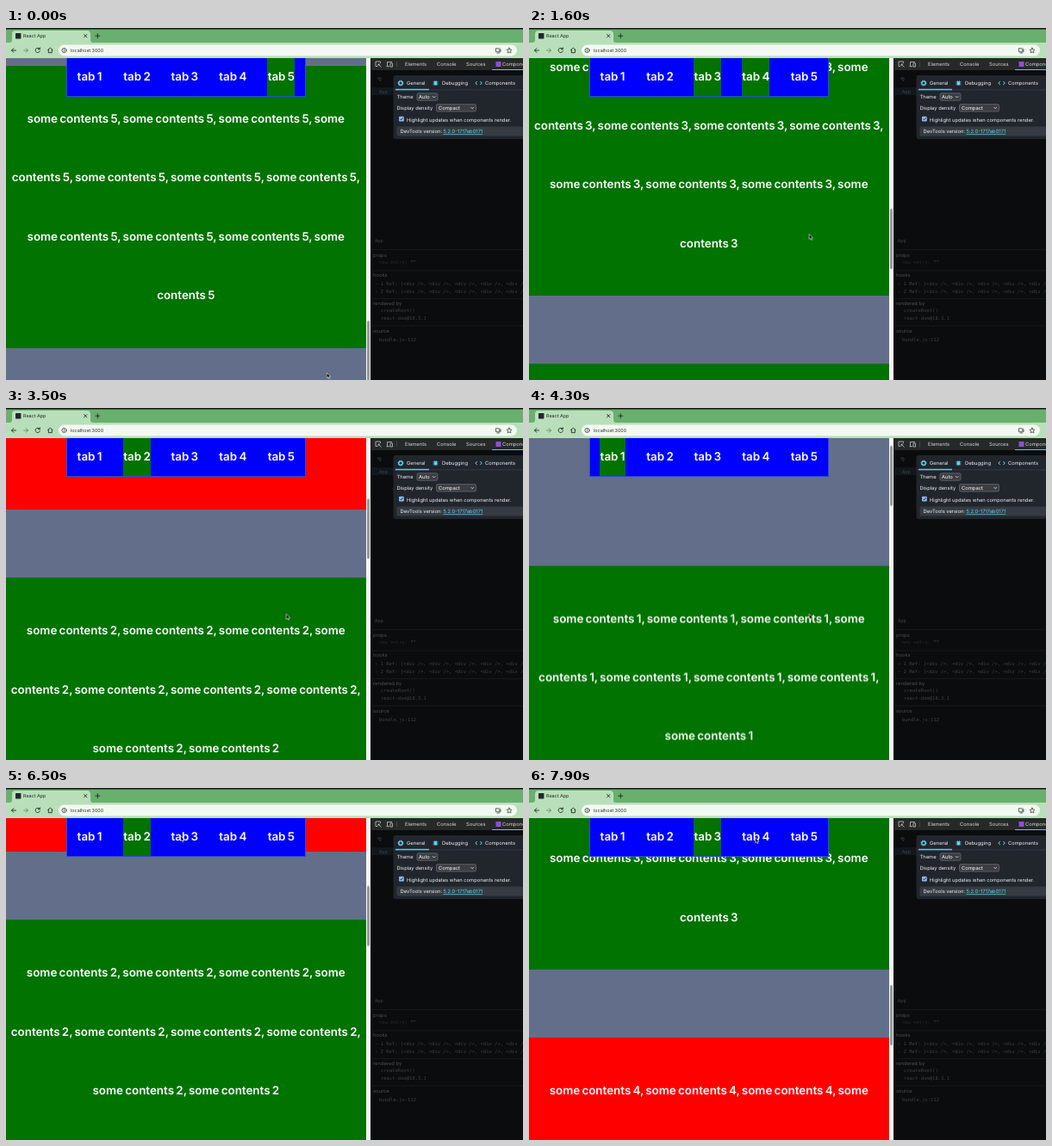
Animation of 600 by 409 pixels, one loop 8 s. Source, as an HTML page:

```html
<!DOCTYPE html>
<html lang="en">
<head>
<meta charset="utf-8">
<title>React App</title>
<style>
  html, body { margin: 0; width: 100%; height: 100%; overflow: hidden; background: #0b0d0e; }
  #stage { position: relative; width: 600px; height: 409px; overflow: hidden; font-family: Inter, "Liberation Sans", sans-serif; }
  #stage > svg { position: absolute; left: 0; top: 0; text-rendering: geometricPrecision; }
  #view { position: absolute; left: 0; top: 35px; width: 417.6px; height: 374px; overflow: hidden; background: #626e8a; color: #fff; font-weight: 600; font-size: 13.4px; word-spacing: -1.1px; text-align: center; white-space: nowrap; text-rendering: geometricPrecision; }
  #page { padding-top: 188.5px; will-change: transform; }
  section { --idle: #f00; margin-bottom: 78.8px; padding: 28.3px 0 26.3px; line-height: 68.35px; }
  nav { --idle: #00f; position: absolute; left: 70px; top: 0; width: 277.5px; height: 44.4px; line-height: 45px; }
  nav i { position: absolute; top: 0; height: 100%; background: #00f; }
  nav b { position: absolute; top: 0; height: 100%; font-weight: 600; }
  nav u { position: absolute; inset: 0 -.5px -.5px; box-sizing: border-box; border: 1px solid #2a4ccf; border-top: 0; animation: outline 8s step-end infinite; }
  #track { position: absolute; left: 417.6px; top: 35px; width: 5.8px; height: 374px; background: #f7f8f7; }
  #thumb { position: absolute; left: 1.2px; top: 1px; width: 3.4px; height: 70px; border-radius: 2px; background: #979998; }

  .n1 { animation: on1 8s step-end infinite; }
  .n2 { animation: on2 8s step-end infinite; }
  .n3 { animation: on3 8s step-end infinite; }
  .n4 { animation: on4 8s step-end infinite; }
  .n5 { animation: on5 8s step-end infinite; }
  @keyframes on1 { 0%, 77.5%, to { background: var(--idle); } 47.5% { background: #007300; } }
  @keyframes on2 { 0%, 50%, 92.5%, to { background: var(--idle); } 30%, 75% { background: #007300; } }
  @keyframes on3 { 0%, 32.5% { background: var(--idle); } 18.75%, 90%, to { background: #007300; } }
  @keyframes on4 { 0%, 21.25%, to { background: var(--idle); } 10% { background: #007300; } }
  @keyframes on5 { 0% { background: #007300; } 12.5%, to { background: var(--idle); } }
  @keyframes outline { 0%, 71.25%, to { opacity: 1; } 57.5% { opacity: 0; } }
</style>
</head>
<body>
<div id="stage">
  <div id="view">
    <div id="page"></div>
    <nav></nav>
  </div>
  <div id="track"><div id="thumb"></div></div>

  <!-- browser bar -->
  <svg width="600" height="35" font-size="5.4" fill="none" stroke-linecap="round">
    <path fill="#69b06e" d="M0 0h600v36H0z"/>
    <path fill="#101511" d="M0 0h600v1.400H0z"/>
    <path fill="#b9dfba" d="M0 17h4q3 0 3-3V7q0-4 4-4h83q4 0 4 4v7q0 3 3 3h499v18H0z"/>
    <rect x="11" y="6" width="6.400" height="6.400" rx=".6" fill="#20262c"/>
    <text x="20" y="11.200" fill="#1b261c">React App</text>
    <g stroke="#1f2d20" stroke-width=".9">
      <path d="M90.500 7.500l3.400 3.400m0-3.400l-3.400 3.400M103.800 9.200h5m-2.500-2.500v5"/>
      <path d="M11.500 26H6.500m2.300-2.400L6.500 26l2.300 2.400"/>
      <path stroke="#6d8a6f" d="M20.500 26h5m-2.300-2.400l2.300 2.400-2.300 2.400"/>
      <path d="M39 24.300a2.700 2.700 0 1 0 .4 2.400M39.300 22.800v1.900h-1.900"/>
      <path d="M48.500 25.600l2.800-2.500 2.800 2.500m-4.800-.4v3.500h4v-3.500"/>
    </g>
    <rect x="61" y="19.500" width="532" height="13" rx="6.500" fill="#f3f9f2"/>
    <g stroke="#364037" stroke-width=".8">
      <circle cx="67.500" cy="26" r="2.600"/>
      <path d="M67.500 25.800v1.400m0-2.700v.1"/>
      <path d="M571.500 23.700h-3v4h5.500v-1.700m-4 3h2.500m.5-5.300v2.500m-1.200-1.100l1.200 1.200 1.200-1.200"/>
      <path stroke-linejoin="round" d="M584 23.100l.9 1.900 2.100.3-1.500 1.500.4 2.100-1.900-1-1.900 1 .4-2.100-1.500-1.500 2.100-.3z"/>
    </g>
    <text x="75" y="28" fill="#242c25">localhost:3000</text>
  </svg>

  <!-- developer tools -->
  <svg width="600" height="409" font-size="5.8">
    <path fill="#0a0c0d" d="M423.400 35H600v374H423.400z"/>
    <path fill="#252927" d="M423.400 35H600v14H423.400z"/>
    <g fill="none" stroke="#c3c8c4" stroke-width=".8">
      <path d="M434.500 40.800V39h-5.500v5.500h2M432 42l3.500 3.500m-3.500-1.200V42h2.300"/>
      <path d="M442.500 44.500v-5h5.500M441.500 44.700h3.500m1-3.700h2.500v4H446z"/>
      <path stroke="#4b504d" d="M453.500 38.500v7"/>
    </g>
    <g fill="#d5d9d6">
      <text x="463" y="44">Elements</text>
      <text x="500" y="44">Console</text>
      <text x="534" y="44">Sources</text>
      <text x="576" y="44">Components</text>
    </g>
    <path fill="#8f4fd0" d="M568.500 39h6v6h-6z"/>
    <path fill="#78b6f4" d="M564 48h36v1h-36z"/>

    <path fill="#11171d" d="M424 69h26v9h-26z"/>
    <path fill="none" stroke="#1c1f20" stroke-width=".7" d="M424 257.500h176M424 282h176M424 314.500h176M424 346h176"/>
    <path fill="none" stroke="#44494a" stroke-width=".7" d="M431 58l4 4m-3-4h3v3"/>
    <g fill="#3f4344" font-family="'DejaVu Sans Mono', monospace" font-size="5.500">
      <text x="433" y="75.500">App</text>
      <text x="428" y="249">App</text>
      <text x="433" y="273.500" fill="#26292a">new entry: <tspan fill="#55595a">""</tspan></text>
      <text x="428" y="298.700">› 1 Ref: [&lt;div /&gt;, &lt;div /&gt;, &lt;div /&gt;, &lt;div /&gt;, &lt;div /&gt;]</text>
      <text x="428" y="308">› 2 Ref: [&lt;div /&gt;, &lt;div /&gt;, &lt;div /&gt;, &lt;div /&gt;, &lt;div /&gt;]</text>
      <text x="435" y="330">createRoot()</text>
      <text x="435" y="339.300">react-dom@18.3.1</text>
      <text x="433" y="364">bundle.js:112</text>
    </g>
    <g fill="#4d5152">
      <text x="426" y="265.500">props</text>
      <text x="426" y="289">hooks</text>
      <text x="426" y="321.500">rendered by</text>
      <text x="426" y="354">source</text>
    </g>

    <!-- settings -->
    <path fill="#21252c" d="M600 55H452q-2.500 0-2.500 3v68q0 3 2.500 3h148z"/>
    <path fill="#3d424b" d="M449.500 71.500H600v.7H449.500z"/>
    <path fill="#61c8e8" d="M452 70.800h39v1.400h-39z"/>
    <g fill="none" stroke-width="1.300">
      <g stroke="#61dafb">
        <circle cx="458" cy="64" r="2.200"/>
        <circle cx="458" cy="64" r="3" stroke-width=".9" stroke-dasharray="1.200 1.156"/>
        <path stroke-width="1" d="M546.800 62l-2 2 2 2m3.500-4l2 2-2 2"/>
      </g>
      <ellipse cx="498.500" cy="64.200" rx="1.700" ry="2.300" fill="#61dafb" stroke="none"/>
      <path stroke="#61dafb" stroke-width=".7" d="M495.600 62.500h5.800m-5.800 1.700h5.800m-5.800 1.700h5.800M497 61l.8.900m2.200-.9l-.8.900"/>
    </g>
    <g fill="#f0f1f3">
      <text x="465" y="66.400">General</text>
      <text x="506" y="66.400">Debugging</text>
      <text x="556" y="66.400">Components</text>
      <text x="453.500" y="82">Theme</text>
      <text x="453.500" y="95">Display density</text>
      <text x="465" y="108.600">Highlight updates when components render.</text>
    </g>
    <g fill="#3a3d42" stroke="#777b82" stroke-width=".6">
      <rect x="477" y="75.800" width="24" height="8.400" rx="1.500"/>
      <rect x="499.500" y="88.600" width="46" height="8.400" rx="1.500"/>
    </g>
    <g fill="#fff">
      <text x="479" y="82">Auto</text>
      <text x="502" y="95">Compact</text>
    </g>
    <path fill="none" stroke="#e8e9ea" stroke-width=".8" d="M495 79.200l1.700 1.700 1.700-1.700M539.500 92l1.700 1.700 1.700-1.700"/>
    <rect x="456" y="102.800" width="5.800" height="5.800" rx="1" fill="#8dbcf5"/>
    <path fill="none" stroke="#17202b" stroke-width=".9" d="M457.300 105.700l1.200 1.300 2.100-2.800"/>
    <path fill="#363b42" d="M600 114.500H455q-1.500 0-1.500 1.500v8q0 1.500 1.500 1.500h145z"/>
    <text x="457.500" y="122" fill="#f0f1f3">DevTools version:</text>
    <text x="507.500" y="122" fill="#61dafb" text-decoration="underline">5.2.0-1717ab0171</text>
  </svg>

  <svg id="cursor" width="8" height="11">
    <path d="M.6.6v6l1.400-1.200 1 2.200 1.100-.5-1-2.100h1.800z" fill="#000" stroke="#fff" stroke-width=".6"/>
  </svg>
</div>

<script>
  const LOOP = 8000, STEP = 100;
  const $ = q => document.querySelector(q);

  // Repeats per section; lines break after a fixed number of words.
  const repeats = [8, 9, 11, 9, 11];
  const breakLines = (text, sizes) => {
    const words = text.split(" ");
    return sizes.map(n => words.splice(0, n).join(" ")).filter(Boolean).join("<br>");
  };
  $("#page").innerHTML = repeats.map((count, i) => {
    const text = Array(count).fill(`some contents ${i + 1}`).join(", ");
    return `<section class="n${i + 1}">${breakLines(text, [10, 11, 10, 11])}</section>`;
  }).join("");

  // Tab left edges inside the bar; blue fills the rest.
  const lefts = [12, 66, 121.3, 177.3, 233.3], barWidth = 277.5;
  let edge = 0, bar = "";
  lefts.forEach((x, i) => {
    const w = i ? 32 : 30;
    bar += `<i style="left:${edge}px;width:${x - edge}px"></i>` +
      `<b class="n${i + 1}" style="left:${x}px;width:${w}px">tab ${i + 1}</b>`;
    edge = x + w;
  });
  $("nav").innerHTML = bar + `<i style="left:${edge}px;width:${barWidth - edge}px"></i><u></u>`;

  // Plays [ms, ...values] points, held for one step at a time.
  function play(el, points, toTransform) {
    const frames = points.map(([ms, ...v], i) => {
      const next = points[i + 1];
      return {
        offset: ms / LOOP,
        transform: toTransform(...v),
        easing: next ? `steps(${(next[0] - ms) / STEP}, end)` : "linear"
      };
    });
    el.animate(frames, { duration: LOOP, iterations: Infinity });
  }

  const scroll = [
    [0, 1602], [300, 1602], [1600, 917], [2300, 624], [3500, 365], [4400, 0],
    [5500, 0], [5600, 10], [5700, 55], [5900, 230], [6100, 375], [6300, 409],
    [6500, 409], [6600, 419], [6800, 500], [7200, 728], [7400, 747], [7500, 747],
    [7600, 760], [7700, 820], [7900, 1017], [8000, 1100]
  ];
  play($("#page"), scroll, s => `translateY(${-s}px)`);
  play($("#thumb"), scroll, s => `translateY(${s / 5.27}px)`);
  play($("#cursor"), [
    [0, 371.6, 400], [200, 371.6, 400], [700, 324.6, 238.7], [4600, 324.6, 238.7],
    [5300, 152, 55], [6000, 152, 55], [6400, 202, 55], [7000, 202, 55],
    [7400, 262, 57], [8000, 262, 57]
  ], (x, y) => `translate(${x}px, ${y}px)`);
</script>
</body>
</html>
```
